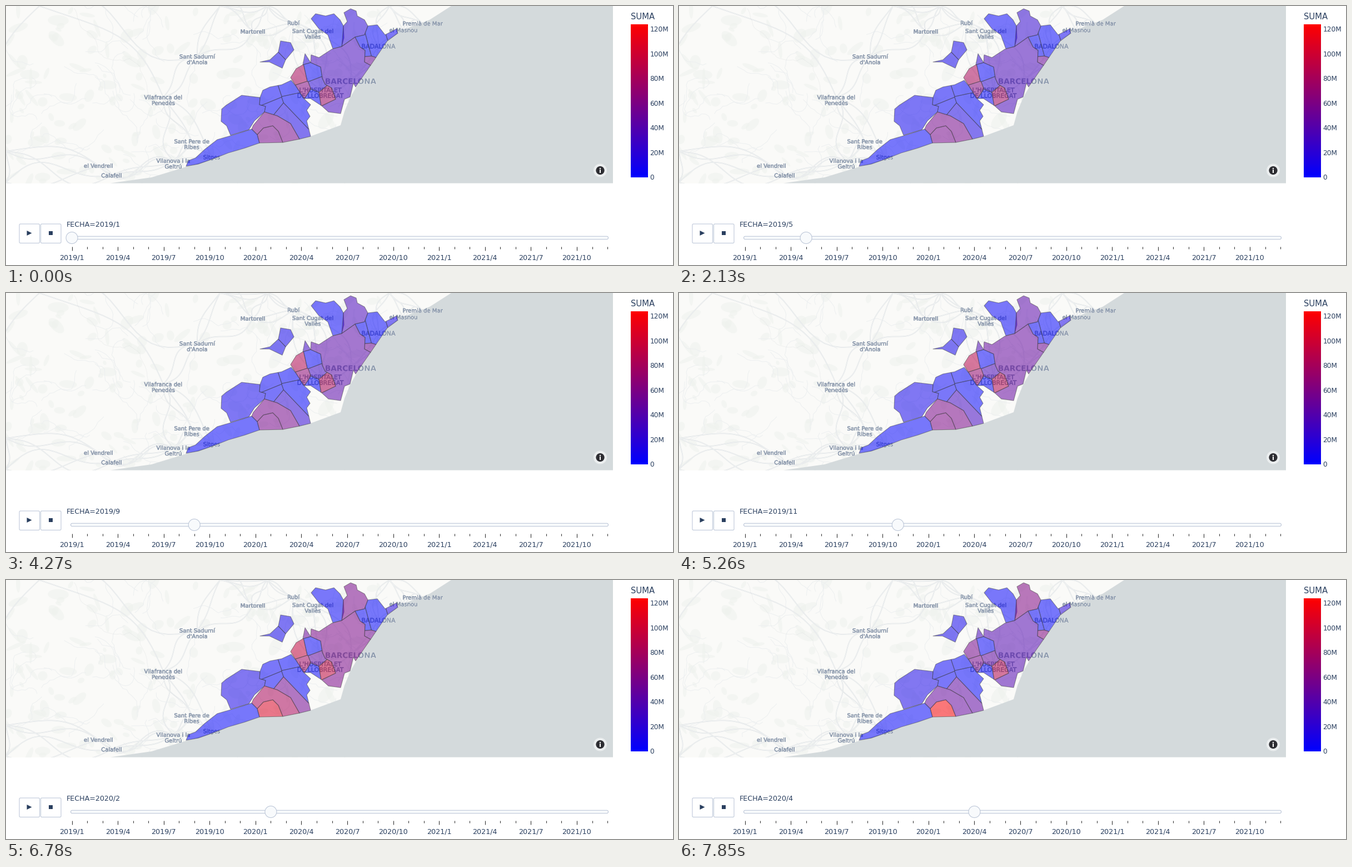
These frames come from a looping animation (1200x467 px, 8000 ms). A matplotlib script:

```python
import numpy as np
import matplotlib.pyplot as plt
from matplotlib.animation import FuncAnimation
from matplotlib.collections import EllipseCollection, LineCollection
from matplotlib.patches import Circle, FancyBboxPatch, Polygon, Rectangle
from matplotlib.patheffects import withStroke

W, H, DPI = 1200, 467, 100
STEP, LOOP = 40, 8000
TICK = 66.45      # ms between visible updates
PERIOD = 7.79     # ticks per month
GRIP_LAG = 0.5    # ticks the grip and map trail the label
PX = 72 / DPI
MAP_W, MAP_H = 1092, 319.5
X0, DX, MONTHS = 118.5, 27.53, 36
INK, BORDER, PALE = "#2a3f5f", "#bec8d9", "#f8fafc"
LAND, SEA, PLACE = "#fafaf8", "#d4dadc", "#909db0"

plt.rcParams["font.family"] = "DejaVu Sans"
fig = plt.figure(figsize=(W / DPI, H / DPI), dpi=DPI, facecolor="white")
ax = fig.add_axes([0, 0, 1, 1])
ax.axis("off")
rng = np.random.default_rng(7)


def rect(x0, y0, x1, y1, color, z):
    ax.add_patch(Rectangle((x0, y0), x1 - x0, y1 - y0, fc=color, lw=0, zorder=z))


def disc(x, y, r, color, z, alpha=1):
    ax.add_patch(Circle((x, y), r, fc=color, alpha=alpha, lw=0, zorder=z))


def rounded(x0, y0, x1, y1, radius, fill):
    style = f"round,pad=0,rounding_size={radius}"
    ax.add_patch(FancyBboxPatch((x0, y0), x1 - x0, y1 - y0, boxstyle=style,
                                fc=fill, ec=BORDER, lw=1.1 * PX, zorder=20))


def text(x, y, s, size, ha="left", color=INK, z=22, **kw):
    """Text whose capitals are centred on y."""
    return ax.text(x, y + 0.365 * size, s, fontsize=size * PX, ha=ha,
                   va="baseline", color=color, zorder=z, **kw)


def lines(paths, color, width, z, **kw):
    ax.add_collection(LineCollection(paths, colors=color, linewidths=width * PX,
                                     zorder=z, **kw))


# ---- base map

towns = []


def town(x, y, name, size=10, **kw):
    """A label of one or more lines, the first centred on (x, y)."""
    towns.append((x, y))
    effects = [withStroke(linewidth=1.4 * PX, foreground=LAND, alpha=0.7)]
    if size < 12:
        effects.append(withStroke(linewidth=0.45 * PX, foreground=PLACE))
    for row, line in enumerate(name.split("\n")):
        text(x, y + 10.3 * row, line, size, "center", PLACE, 6,
             path_effects=effects, **kw)


def wander(x, y, n, stride, turn, heading=None):
    """A random winding line."""
    start = rng.uniform(0, 2 * np.pi) if heading is None else heading
    angle = start + np.cumsum(rng.normal(0, turn, n))
    return np.column_stack([x + np.cumsum(stride * np.cos(angle)),
                            y + np.cumsum(stride * np.sin(angle))])


def road(a, b):
    """A gently bent road between two towns."""
    a, b = np.array(a), np.array(b)
    t = np.linspace(0, 1, 20)[:, None]
    bend = rng.normal(0, 0.1) * np.sin(np.pi * t) + rng.normal(0, 0.06) * np.sin(2 * np.pi * t)
    across = (b - a)[::-1] * (-1, 1)
    return a + (b - a) * t + across * bend


def draw_towns():
    town(444, 46, "Martorell")
    town(517, 30.5, "Rubí")
    town(552, 45, "Sant Cugat del\nVallès")
    town(749.5, 31.5, "Premià de Mar")
    town(715, 43.5, "el Masnou")
    town(344, 91, "Sant Sadurní\nd'Anoia")
    town(283, 164.5, "Vilafranca del\nPenedès")
    town(334, 244, "Sant Pere de\nRibes")
    town(301, 279, "Vilanova i la\nGeltrú")
    town(166.5, 288, "el Vendrell")
    town(190, 305.5, "Calafell")
    town(370, 272.5, "Sitges")
    town(670, 72.5, "BADALONA", 11)
    town(565.5, 151.3, "L'HOSPITALET\nDE LLOBREGAT", 11)
    town(620, 135.5, "BARCELONA", 13.6, weight="bold")


def draw_land():
    rect(0, 0, MAP_W, MAP_H, LAND, 0)
    n = 220
    centres = rng.uniform((0, 0), (720, MAP_H), (n, 2))
    ax.add_collection(EllipseCollection(
        rng.uniform(6, 40, n), rng.uniform(5, 20, n), rng.uniform(0, 180, n),
        units="xy", offsets=centres, offset_transform=ax.transData,
        facecolors="#eff2ee", alpha=0.6, linewidths=0, zorder=1))

    lanes = [wander(*rng.uniform((0, 0), (700, MAP_H)), 14, 7, 0.45)
             for _ in range(70)]
    streets = [wander(*rng.normal((590, 105), 50), 8, 7, 0.2) for _ in range(55)]
    lines(lanes + streets, "#eceff0", 0.9, 2)

    hubs = towns + [(0, 262), (0, 318), (60, 0), (385, 0), (470, 0), (690, 0)]
    roads = []
    for hub in hubs:
        near = sorted(hubs, key=lambda h: np.hypot(h[0] - hub[0], h[1] - hub[1]))
        roads += [road(hub, other) for other in near[1:4]]
    lines(roads, "#e1e5e7", 1.8, 3)
    lines(roads, "#f6f7f7", 0.6, 3.1)
    lines([wander(120, 0, 55, 6, 0.35, np.pi / 2)], "#dcdfe0", 0.9, 3.2,
          linestyles="dotted")


def draw_sea():
    coast = [(801, 0), (762, 25), (706, 46), (686, 64), (656, 108), (629, 148),
             (619, 166), (609, 190), (602, 215), (548, 235), (498, 246),
             (456, 247), (400, 266), (324, 290), (262, 309), (188, MAP_H)]
    ax.add_patch(Polygon(coast + [(MAP_W, MAP_H), (MAP_W, 0)], fc=SEA, lw=0, zorder=4))


# ---- districts

districts = []


def level(month, base, gain=0, swing=0, power=2):
    """Rise until February 2020, then swing over the next two months."""
    return (base + gain * (min(month, 13) / 13) ** power
            + swing * max(month - 13, 0) / 2)


def district(corners, *trend):
    patch = Polygon(corners, ec="#444444", lw=1.1 * PX, alpha=0.52,
                    joinstyle="round", zorder=8)
    ax.add_patch(patch)
    districts.append((patch, trend))


def nearer(corners, seed, other):
    """Keep the part of a polygon closer to seed than to other."""
    seed, other = np.array(seed), np.array(other)
    side = [(np.array(p) - (seed + other) / 2) @ (seed - other) for p in corners]
    kept = []
    for i, p in enumerate(corners):
        q, a, b = corners[i - 1], side[i - 1], side[i]
        if a * b < 0:
            kept.append(tuple(np.array(q) + (np.array(p) - q) * a / (a - b)))
        if b >= 0:
            kept.append(p)
    return kept


def split(outline, *cells):
    """Divide an outline among seeds given as (x, y, *trend)."""
    for cell in cells:
        corners = outline
        for rival in cells:
            if rival is not cell:
                corners = nearer(corners, cell[:2], rival[:2])
        district(corners, *cell[2:])


def draw_districts():
    # North
    district([(549, 23), (557, 14), (575, 18), (590, 14), (601, 25), (607, 36),
              (608, 57), (604, 73), (588, 77), (579, 52), (563, 41)], 0.01)
    district([(608, 12), (620, 5), (630, 9), (632, 18), (645, 25), (651, 36),
              (645, 52), (628, 56), (604, 73), (607, 36), (614, 28)],
             0.15, 0.31, 0.03)
    split([(628, 56), (645, 52), (651, 36), (668, 34), (682, 52), (703, 41),
           (705, 49), (686, 63), (656, 107), (645, 101), (646, 80), (637, 74)],
          (639, 66, 0.01), (661, 60, 0), (643, 117, 0.4, 0.03, 0.07),
          (707, 46, 0.04, 0.08, 0.03))
    split([(457, 101), (475, 97), (490, 83), (494, 63), (512, 66), (518, 79),
           (503, 97), (497, 112), (474, 101)],
          (507, 79, 0.06), (485, 100, 0.06))

    # Centre
    district([(628, 56), (637, 74), (646, 80), (645, 101), (656, 107),
              (629, 146), (625, 139), (619, 164), (609, 168), (602, 194),
              (580, 191), (568, 180), (593, 168), (586, 148), (574, 141),
              (569, 130), (566, 110), (548, 102), (549, 88), (563, 93),
              (586, 78), (604, 73)], 0.25, 0.22, -0.16)
    district([(538, 86), (548, 102), (534, 106)], 0.12, 0.28, -0.13)
    split([(512, 129), (522, 113), (534, 106), (548, 102), (566, 110),
           (569, 130), (574, 141), (586, 148), (593, 168), (568, 180),
           (548, 167), (536, 167), (522, 145)],
          (526, 127, 0.65, 0.11, -0.31), (553, 121, 0.01),
          (561, 142, 0.15, 0.22), (534, 152, 0.5, 0.12, -0.17),
          (552, 164, 0.01), (576, 160, 0.61, 0.15, -0.06))

    # West
    district([(388, 186), (396, 179), (424, 161), (457, 165), (456, 178),
              (467, 181), (465, 191), (447, 207), (437, 223), (404, 233),
              (397, 216), (387, 208)], 0.04, 0.04)
    split([(457, 165), (462, 152), (475, 146), (496, 142), (513, 134),
           (522, 145), (536, 167), (548, 178), (541, 188), (547, 199),
           (541, 207), (548, 235), (528, 240), (512, 212), (488, 198),
           (465, 191), (467, 181), (456, 178)],
          (475, 160, 0.02), (511, 148, 0), (484, 182, 0.02), (516, 171, 0),
          (495, 191, 0.09, 0.34, -0.07, 3))

    # South coast
    arch = [(452, 232), (463, 220), (480, 216), (490, 226), (498, 246)]
    district(arch + [(456, 247)], 0.45, 0.41, 0.12, 10)
    district([(445, 215), (465, 191), (488, 198), (512, 212), (528, 240)]
             + arch[::-1] + [(442, 222)], 0.45, 0.21, -0.28, 10)
    district([(324, 289), (328, 279), (341, 274), (357, 259), (380, 241),
              (404, 234), (442, 222), (452, 232), (456, 247), (430, 256),
              (400, 265), (366, 278), (346, 285)], 0)


# ---- page and controls

def draw_page():
    rect(0, MAP_H, W, H, "white", 10)
    rect(MAP_W, 0, W, MAP_H, "white", 10)
    disc(1069, 296.5, 12, "white", 12, 0.55)
    disc(1069, 296.5, 7.6, "#2e2e33", 12)
    disc(1069, 293, 1.2, "white", 13)
    rect(1067.9, 295.3, 1070.1, 301, "white", 13)

    t = np.linspace(1, 0, 276)[:, None]
    ax.imshow(np.stack([t, 0 * t, 1 - t], axis=-1), extent=(1124, 1155, 309, 33),
              aspect="auto", interpolation="nearest", zorder=20)
    text(1124, 18.5, "SUMA", 14.7)
    for k in range(7):
        text(1158.5, 309 - 44.57 * k, f"{20 * k}M" if k else "0", 12.1)


def draw_controls():
    rounded(24, 393, 60.5, 427.5, 2, "white")
    rounded(62.5, 393, 99, 427.5, 2, "white")
    ax.add_patch(Polygon([(37.5, 405), (37.5, 414), (46.5, 409.5)],
                         fc=INK, lw=0, zorder=22))
    rect(77, 406, 84, 413, INK, 22)
    rounded(116.5, 415.3, 1083.5, 420.7, 2.6, PALE)
    for i in range(MONTHS):
        x = X0 + DX * i
        major = i % 3 == 0
        lines([[(x, 433.5), (x, 440.5 if major else 437.5)]], "#333333", 1.1, 21)
        if major:
            text(x, 453, month_name(i), 12.7, "center")


def month_name(i):
    return f"{2019 + i // 12}/{i % 12 + 1}"


draw_towns()
draw_land()
draw_sea()
draw_districts()
draw_page()
draw_controls()
ax.set_xlim(0, W)
ax.set_ylim(H, 0)
grip = Circle((X0, 418), 10.5, fc=PALE, ec=BORDER, lw=1.1 * PX, zorder=24)
ax.add_patch(grip)
label = text(108.5, 393, "", 12.6)


def update(i):
    tick = int((i * STEP + STEP - 10) / TICK)
    shown = int(tick / PERIOD)
    moved = int(max(tick - GRIP_LAG, 0) / PERIOD)
    label.set_text("FECHA=" + month_name(shown))
    grip.center = (X0 + DX * moved, 418)
    for patch, trend in districts:
        v = level(moved, *trend)
        patch.set_facecolor((v, 0, 1 - v))
    return [label, grip] + [patch for patch, _ in districts]


anim = FuncAnimation(fig, update, frames=LOOP // STEP, interval=STEP,
                     repeat=True, repeat_delay=0, blit=False)
plt.show()
```
